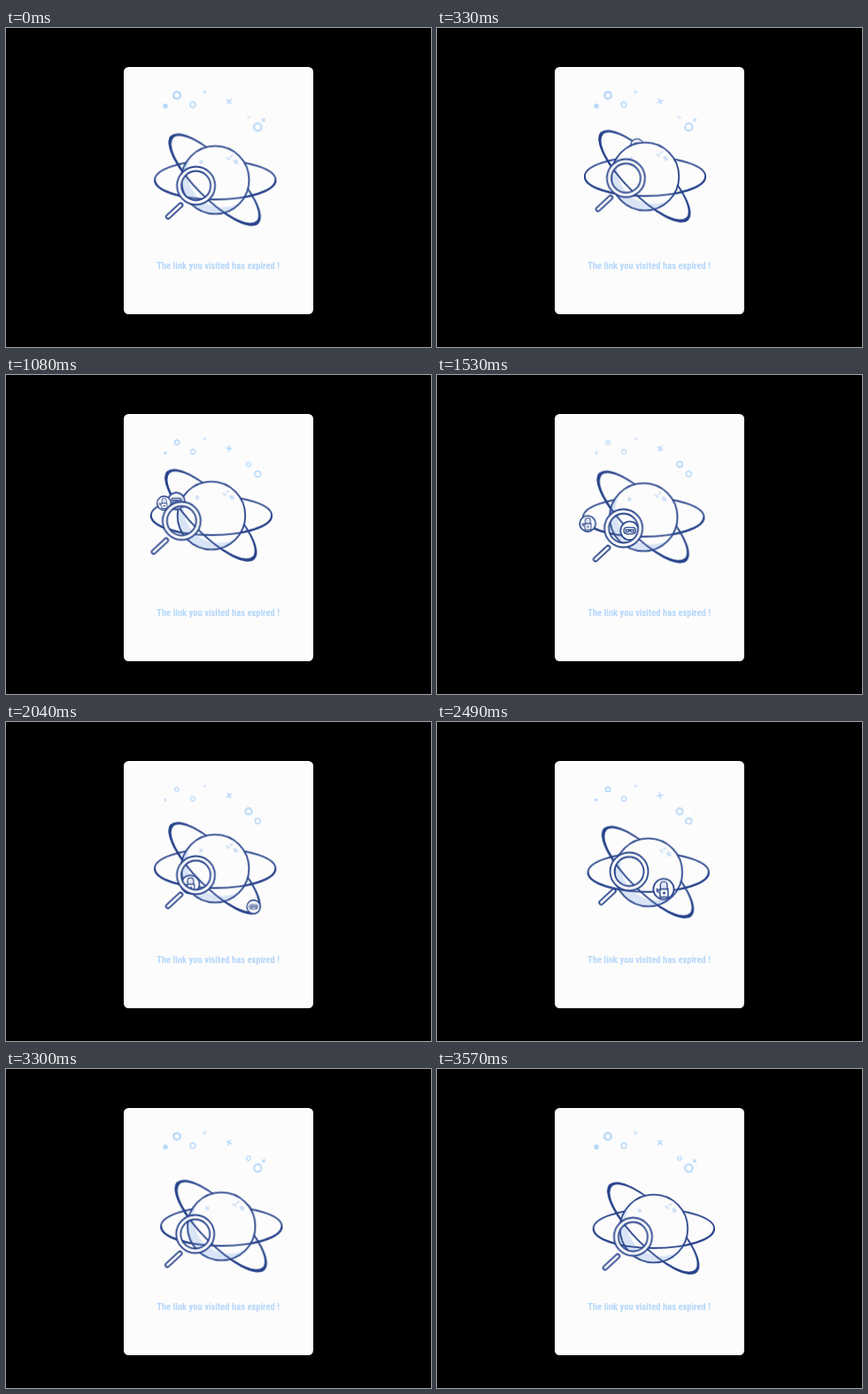
Recreate the animation shown at these times as an HTML page. Size 480 by 360 pixels, loop 3600 ms.

```html
<!DOCTYPE html>
<html lang="en">
<head>
<meta charset="utf-8">
<title>Link expired</title>
<style>
html, body { margin: 0; width: 100%; height: 100%; overflow: hidden; background: #000; }
svg { display: block; width: 480px; height: 360px; }
.navy { fill: none; stroke: #27438b; stroke-width: 1.8; }
.paper { fill: #fcfcfc; }
.tint { fill: #d9e5f6; }
.disc { fill: #fcfcfc; stroke: #27438b; stroke-width: 1.8; }
.fine { fill: none; stroke: #27438b; stroke-width: 1.4; }
.sky { fill: none; stroke: #b5d7fa; }
.dot { fill: #b5d7fa; }
text { font: 700 10.57px "Roboto Condensed", Roboto, sans-serif; font-stretch: 75%; fill: #b5d7fa; text-anchor: middle; }

.drift, .lens, .vr, .lock, .spin { animation: 3.6s linear infinite; }
.drift { animation-name: drift; }
@keyframes drift {
  0% { transform: translate(236.3px, 171.5px); }
  33.33% { transform: translate(231.4px, 157.2px); }
  100% { transform: translate(245px, 180.4px); }
}

.lens { animation-name: lens; }
@keyframes lens {
  0% { transform: rotate(18deg) translate(4.7px) rotate(-18deg); }
  18.33% { transform: rotate(-86deg) translate(6.5px) rotate(86deg); }
  42.5% { transform: rotate(-295deg) translate(8.3px) rotate(295deg); }
  56.67% { transform: rotate(-331deg) translate(5.1px) rotate(331deg); }
  69.17% { transform: rotate(-413deg) translate(7.5px) rotate(413deg); }
  83.33% { transform: rotate(-503deg) translate(5px) rotate(503deg); }
  100% { transform: rotate(-672deg) translate(5px) rotate(672deg); }
}

.vr, .lock { offset-rotate: 0deg; }
.vr { offset-path: path("M15.2 -15.8A67.5 22 45 0 0 -15.8 15.2A67.5 22 45 0 0 15.2 -15.8"); animation-name: vr; }
.lock { offset-path: path("M0 -21.5A69 20.5 0 0 0 0 19.5A69 20.5 0 0 0 0 -21.5"); animation-name: lock; }
@keyframes vr {
  0% { offset-distance: 0%; transform: scale(.5); }
  18.33% { offset-distance: 22.3%; transform: scale(.74); }
  42.5% { offset-distance: 50%; transform: scale(.9); }
  56.67% { offset-distance: 75%; transform: scale(.64); }
  69.17% { offset-distance: 96%; transform: scale(.45); }
  75%, 100% { offset-distance: 100%; transform: scale(.4); }
}
@keyframes lock {
  0%, 9% { offset-distance: 0%; transform: scale(.5); }
  42.5% { offset-distance: 28.5%; transform: scale(.76); }
  56.67% { offset-distance: 40.7%; transform: scale(.88); }
  69.17% { offset-distance: 55.7%; transform: scale(1); }
  83.33% { offset-distance: 81.3%; transform: scale(.48); }
  100% { offset-distance: 100%; transform: scale(.4); }
}

/* Front copies show only while the icon is clear of the planet's far side. */
.near { animation: 3.6s step-end infinite; }
.near.a { animation-name: nearA; }
.near.b { animation-name: nearB; }
@keyframes nearA { 0%, 64% { opacity: 0; } 11% { opacity: 1; } }
@keyframes nearB { 0%, 86% { opacity: 0; } 25% { opacity: 1; } }

.pulse { animation: pulse 3.6s ease-in-out infinite; }
@keyframes pulse {
  0%, 100% { transform: scale(1); }
  50% { transform: scale(var(--low)); }
}
.swell { animation: swell 3.6s ease-in-out infinite; }
@keyframes swell {
  0% { transform: scale(.35); }
  62% { transform: scale(1.1); }
  100% { transform: scale(.65); }
}
.spin { animation-name: spin; }
@keyframes spin { from { transform: rotate(45deg); } to { transform: rotate(225deg); } }
</style>
</head>
<body>
<svg viewBox="0 0 480 360">
  <defs>
    <clipPath id="half"><rect x="-75" y="0" width="150" height="30"/></clipPath>
    <clipPath id="ball"><circle r="38.5"/></clipPath>
    <ellipse id="flat" class="navy" rx="68.2" ry="22"/>
    <path id="tilt" fill="#27438b" fill-rule="evenodd"
      d="M-70 0A70 22.8 0 0 1 70 0A70 22.8 0 0 1 -70 0ZM-66.4 0A66.4 21 0 0 0 66.4 0A66.4 21 0 0 0 -66.4 0Z"/>
    <path id="cross" class="sky" d="M-3.7 0H3.7M0 -3.7V3.7"/>
    <g id="goggles">
      <circle class="disc" r="11.6"/>
      <rect class="fine" x="-7.5" y="-4" width="15" height="8" rx="3.8"/>
      <path class="fine" d="M-5 -1.2H5V1.5H2L0 -.8L-2 1.5H-5Z"/>
    </g>
    <g id="padlock">
      <circle class="disc" r="11.6"/>
      <path class="fine" d="M-3.6 0V-4.6a3.8 3.8 0 0 1 7.6 0V0"/>
      <path class="tint" d="M-2 0V-4a2.2 2.2 0 0 1 4.4 0V0Z"/>
      <path class="fine" d="M-4 0H5V9H-4V4.5L-7.5 2.5V0L-4 2ZM.5 3V6M-1 4.5H2"/>
    </g>
  </defs>

  <rect class="paper" x="133" y="44" width="214" height="279" rx="5.5"/>

  <g transform="translate(193 76)"><circle class="sky pulse" r="3.9" stroke-width="2.4" style="--low:.53"/></g>
  <g transform="translate(180 88)"><circle class="dot pulse" r="2.8" style="--low:.45"/></g>
  <g transform="translate(211 86.5)"><circle class="sky pulse" r="3" stroke-width="1.4" style="--low:.8"/></g>
  <g transform="translate(224.3 72.3) rotate(45) scale(.6)"><use href="#cross" class="pulse" stroke-width="1.5" style="--low:.75"/></g>
  <g transform="translate(252 83)"><use href="#cross" class="spin" stroke-width="1.5"/></g>
  <g transform="translate(274 100.8)"><circle class="sky swell" r="3.3" stroke-width="1.8"/></g>
  <g transform="translate(284.3 111.7)"><circle class="sky pulse" r="4.2" stroke-width="2" style="--low:.7"/></g>
  <g transform="translate(291 103.8) scale(.7)"><g class="pulse" style="--low:0"><use href="#cross" class="spin" stroke-width="1.8"/></g></g>

  <g class="drift">
    <use href="#flat"/>
    <use href="#tilt" transform="translate(-.5 -.5) rotate(45)"/>
    <g class="vr"><use href="#goggles"/></g>
    <g class="lock"><use href="#padlock"/></g>

    <g clip-path="url(#ball)">
      <circle class="tint" r="39"/>
      <circle class="paper" cx="8.5" cy="-9" r="40"/>
    </g>
    <g fill="#cfe0f7">
      <circle cx="-16" cy="-20.3" r="2.2"/>
      <rect x="-2.6" y="-1.1" width="5.2" height="2.2" rx="1" transform="translate(14.8 -24) rotate(40)"/>
      <rect x="-2.2" y="-.9" width="4.4" height="1.8" rx=".9" transform="translate(18.5 -27) rotate(-35)"/>
      <ellipse rx="3" ry="2.2" transform="translate(23.2 -20.5) rotate(50)"/>
    </g>
    <circle class="navy" r="38.3"/>

    <use href="#flat" clip-path="url(#half)"/>
    <g transform="translate(-.5 -.5) rotate(45)"><use href="#tilt" clip-path="url(#half)"/></g>
    <g class="near a"><g class="vr"><use href="#goggles"/></g></g>
    <g class="near b"><g class="lock"><use href="#padlock"/></g></g>

    <g transform="translate(-26.2 5)">
      <g class="lens">
        <circle r="19" fill="none" stroke="#fcfcfc" stroke-width="4.4"/>
        <circle class="navy" r="21.5"/>
        <circle class="navy" r="16.5"/>
        <path d="M-17.5 22L-31.5 35" stroke="#27438b" stroke-width="6.4" stroke-linecap="round"/>
        <path d="M-17.5 22L-31.5 35" stroke="#fcfcfc" stroke-width="2.8" stroke-linecap="round"/>
      </g>
    </g>
  </g>

  <text x="239.6" y="271.7">The link you visited has expired !</text>
</svg>
</body>
</html>
```
